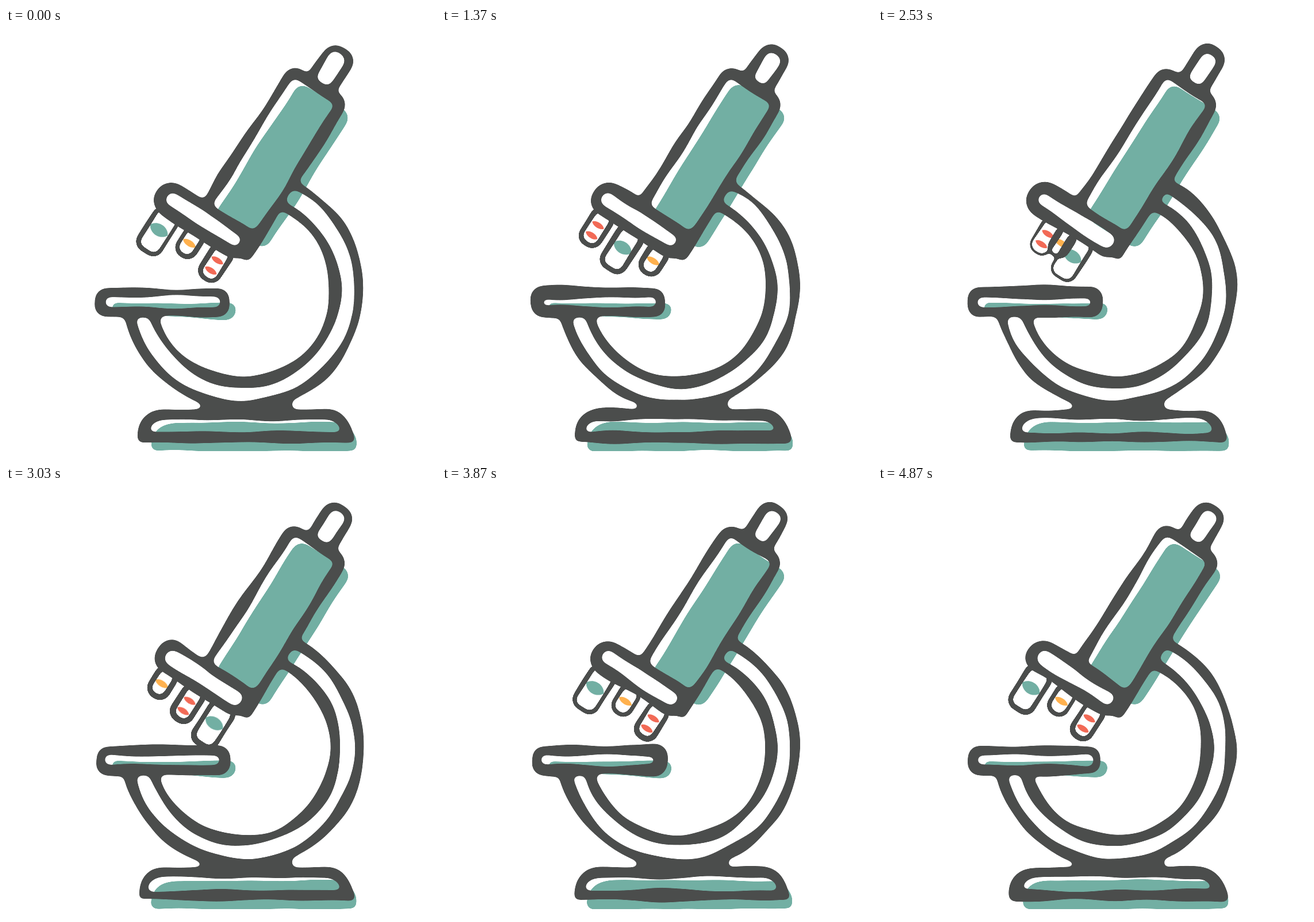
An HTML page for the animation above (5.03 s loop, 748 by 748 pixels).

```html
<!DOCTYPE html>
<html lang="en">
<head>
<meta charset="utf-8">
<title>Microscope</title>
<style>
  html, body { margin: 0; width: 100%; height: 100%; overflow: hidden; background: #fff; }
  svg { display: block; width: 748px; height: 748px; }
  #ink, #lenses { fill: none; stroke: #000; stroke-width: 18; }
  #lenses { stroke-width: 9; }
</style>
</head>
<body>
<svg viewBox="0 0 748 748">
  <defs id="filters"></defs>

  <g filter="url(#tealFilter)">
    <rect class="head" x="13" y="-326" width="109" height="280" rx="18"/>
    <path d="M188 479H386Q399 479 399 490Q399 507 380 507L190 496Q181 490 188 479Z"/>
    <path d="M256 708Q266 686 300 686H575Q600 686 611 715V726Q611 736 600 736H264Q252 736 252 724Z"/>
  </g>

  <g id="marks" class="head"></g>
  <g filter="url(#lensFilter)"><g id="lenses" class="head"></g></g>

  <g id="ink" filter="url(#inkFilter)">
    <g class="head">
      <rect x="26" y="-411" width="43" height="75" rx="17" stroke-width="15"/>
      <rect x="-8" y="-336" width="105" height="282" rx="15"/>
      <rect x="-84" y="-55" width="172" height="43" rx="19"/>
      <path d="M96 -70V-14" stroke-width="20"/>
    </g>
    <path class="arc" data-radius="161.5"/>
    <path class="arc" data-radius="202.5"/>
    <rect x="164" y="460" width="217" height="34" rx="11"/>
    <path d="M342 658H497"/>
    <path d="M238 712Q238 672 278 672H557Q588 672 597 712Z"/>
  </g>
</svg>

<script>
const SVG = 'http://www.w3.org/2000/svg';
const INK = '#4b4d4c', TEAL = '#72afa3', YELLOW = '#ffb14e', RED = '#f26a56';
const LOOP = 5030, POSES = 30;
const byId = id => document.getElementById(id);
const all = selector => [...document.querySelectorAll(selector)];

function add(parent, tag, attributes) {
  const node = parent.appendChild(document.createElementNS(SVG, tag));
  for (const name in attributes) node.setAttribute(name, attributes[name]);
  return node;
}

// Blur, disturb with slow noise and cut at half opacity: wavering lines with soft joints.
const handDrawn = (id, color, blur, rough) => `
  <filter id="${id}" filterUnits="userSpaceOnUse" x="0" y="0" width="748" height="736"
      color-interpolation-filters="sRGB">
    <feGaussianBlur in="SourceGraphic" stdDeviation="${blur}" result="soft"/>
    <feTurbulence type="fractalNoise" baseFrequency="0.012" numOctaves="1" result="noise"/>
    <feComposite in="soft" in2="noise" operator="arithmetic" k1="0" k2="1" k3="${rough}" k4="${-rough / 2}"/>
    <feComponentTransfer result="cut"><feFuncA type="linear" slope="20" intercept="-9.5"/></feComponentTransfer>
    <feFlood flood-color="${color}"/>
    <feComposite in2="cut" operator="in"/>
  </filter>`;

byId('filters').innerHTML = handDrawn('tealFilter', TEAL, 4, 0.7)
  + handDrawn('lensFilter', INK, 2.5, 0.9)
  + handDrawn('inkFilter', INK, 6, 0.9);
const noises = all('feTurbulence');

// Tube, plate and lenses share one tilted frame.
all('.head').forEach(node => node.setAttribute('transform', 'translate(324 361) rotate(32.5)'));

// The arm: concentric arcs from the tube round to the table.
for (const arc of all('.arc')) {
  const r = Number(arc.dataset.radius);
  const at = degrees => {
    const a = degrees * Math.PI / 180;
    return `${412 + r * Math.cos(a)} ${455 + r * Math.sin(a)}`;
  };
  arc.setAttribute('d', `M${at(-66)}A${r} ${r} 0 1 1 ${at(168)}`);
}

const lenses = [
  { half: 21.5, length: 66, color: TEAL, mark: [18, 14], heights: [23] },
  { half: 16.5, length: 38, color: YELLOW, mark: [13, 7], heights: [14] },
  { half: 17.5, length: 51, color: RED, mark: [12, 6.5], heights: [13, 34] }
];
for (const lens of lenses) {
  const { half, length, color, mark: [w, h], heights } = lens;
  const tube = add(byId('lenses'), 'rect',
    { x: -half, y: -14, width: 2 * half, height: length + 14, rx: 15 });
  const spots = heights.map(y => add(byId('marks'), 'path', {
    fill: color,
    d: `M${-w} ${y}C${-w * 0.6} ${y - h} ${w * 0.6} ${y - h} ${w} ${y}`
      + `C${w * 0.6} ${y + h} ${-w * 0.6} ${y + h} ${-w} ${y}Z`
  }));
  lens.parts = [tube, ...spots];
}

// The turret clicks on beats of six poses and rests on the beats left out.
const TURN_BEATS = [0, 2, 3], BEAT = 6, TURN_POSES = 4;
const smooth = x => { x = Math.min(1, Math.max(0, x)); return x * x * (3 - 2 * x); };
const slotX = slot => 3 + 57 * (slot % 3 - 1);

function draw(pose) {
  noises.forEach((noise, k) => noise.setAttribute('seed', pose * noises.length + k + 1));
  const turns = TURN_BEATS.reduce((sum, beat) => sum + smooth((pose - 1 - beat * BEAT) / TURN_POSES), 0);
  const whole = Math.floor(turns), part = turns - whole;
  lenses.forEach(({ parts }, k) => {
    const from = slotX(k + whole), to = slotX(k + whole + 1);
    parts.forEach(node => node.setAttribute('transform', `translate(${from + (to - from) * part} 0)`));
  });
  byId('lenses').style.strokeWidth = 9 - 2.5 * Math.sin(Math.PI * part);
}

const poseStart = i => i ? 10 * Math.round((200 + (i - 1) * 500 / 3) / 10) : 0;
let shown = -1;
function tick() {
  const time = performance.now() % LOOP;
  let pose = POSES - 1;
  while (poseStart(pose) > time) pose--;
  if (pose !== shown) draw(shown = pose);
  requestAnimationFrame(tick);
}
tick();
</script>
</body>
</html>
```
